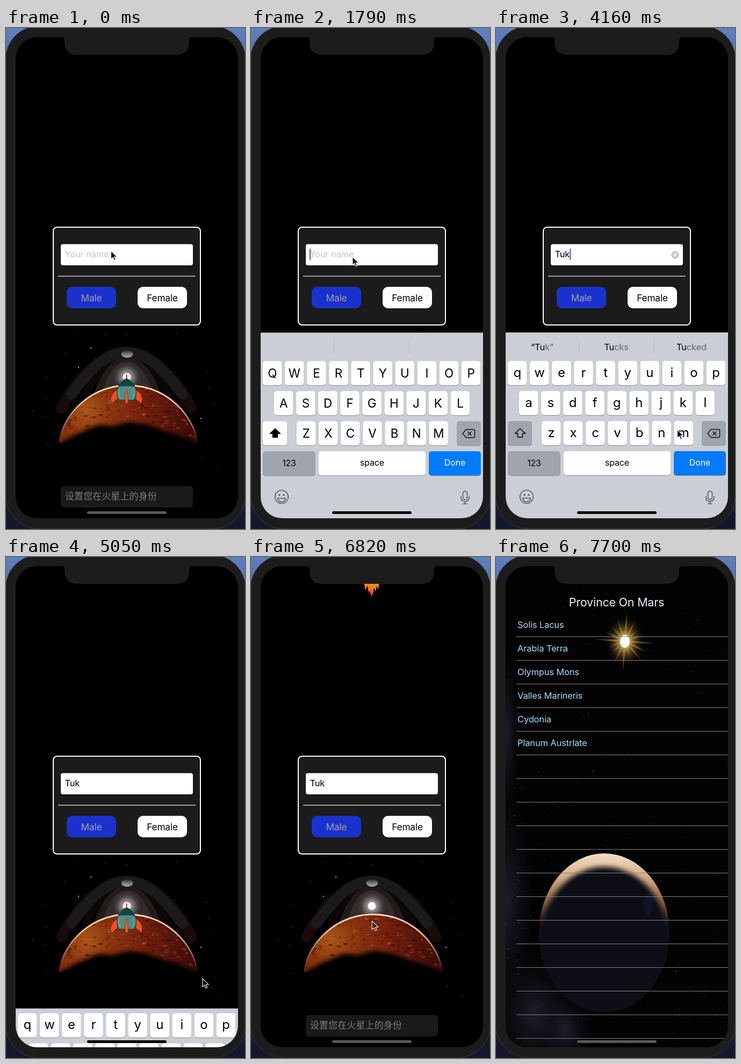
An HTML page for the animation above (7.85 s loop, 445x933 px).

```html
<!DOCTYPE html>
<html lang="en">
<head>
<meta charset="utf-8">
<title>Mars identity</title>
<style>
  html, body { margin: 0; width: 100%; height: 100%; overflow: hidden; background: #1c1c1c; }
  svg { display: block; width: 100%; height: 100%; }
  text { font-family: Inter, Roboto, sans-serif; font-size: 16.5px; letter-spacing: -.01em; white-space: pre; }
  .mid { text-anchor: middle; }
  .cjk { font-family: "Noto Sans CJK SC", "Noto Sans CJK", sans-serif; font-size: 17px; letter-spacing: .1px; }
</style>
</head>
<body>
<svg viewBox="0 0 445 933" preserveAspectRatio="none">
  <defs>
    <linearGradient id="desk" x2="0" y2="1">
      <stop offset="0" stop-color="#5f80bd"/><stop offset=".1" stop-color="#4a66a2"/>
      <stop offset=".9" stop-color="#1d1f38"/><stop offset="1" stop-color="#14172a"/>
    </linearGradient>
    <radialGradient id="mars" gradientUnits="userSpaceOnUse" cx="150" cy="712" r="215">
      <stop offset="0" stop-color="#a9581a"/><stop offset=".2" stop-color="#8c350f"/>
      <stop offset=".5" stop-color="#74200d"/><stop offset="1" stop-color="#33090a"/>
    </radialGradient>
    <linearGradient id="rim" gradientUnits="userSpaceOnUse" x1="0" y1="662" x2="0" y2="772">
      <stop offset="0" stop-color="#fff3e6"/><stop offset=".35" stop-color="#e2b79a"/>
      <stop offset=".75" stop-color="#8f5a44"/><stop offset="1" stop-color="#3a1a14" stop-opacity="0"/>
    </linearGradient>
    <radialGradient id="halo">
      <stop offset="0" stop-color="#fff"/><stop offset=".15" stop-color="#eee"/>
      <stop offset=".3" stop-color="#8d8785"/><stop offset=".6" stop-color="#4a4645"/>
      <stop offset="1" stop-color="#221f1f" stop-opacity="0"/>
    </radialGradient>
    <linearGradient id="moon" x2="0" y2="1">
      <stop offset="0" stop-color="#222"/><stop offset=".5" stop-color="#777"/><stop offset="1" stop-color="#aaa"/>
    </linearGradient>
    <linearGradient id="flame" x2="0" y2="1">
      <stop offset="0" stop-color="#ffe14a"/><stop offset=".7" stop-color="#ffa024"/>
      <stop offset=".86" stop-color="#f47a20"/><stop offset="1" stop-color="#e0202c"/>
    </linearGradient>
    <radialGradient id="sun">
      <stop offset="0" stop-color="#fff"/><stop offset=".25" stop-color="#fff3c0"/>
      <stop offset=".5" stop-color="#c08f35" stop-opacity=".6"/><stop offset="1" stop-color="#3a2a10" stop-opacity="0"/>
    </radialGradient>
    <linearGradient id="crescent" gradientUnits="userSpaceOnUse" x1="0" y1="552" x2="0" y2="690">
      <stop offset="0" stop-color="#f3dfc8"/><stop offset=".3" stop-color="#d6b08a"/>
      <stop offset=".7" stop-color="#7d5637"/><stop offset="1" stop-color="#0e0e17"/>
    </linearGradient>
    <radialGradient id="haze">
      <stop offset="0" stop-color="#252735" stop-opacity=".75"/><stop offset="1" stop-color="#15151c" stop-opacity="0"/>
    </radialGradient>
    <filter id="soft" x="-20%" y="-20%" width="140%" height="140%"><feGaussianBlur stdDeviation="4"/></filter>
    <filter id="drop" x="-40%" y="-20%" width="180%" height="150%">
      <feDropShadow dx="0" dy="2" stdDeviation="4" flood-opacity=".25"/>
    </filter>
    <clipPath id="screen"><rect x="18" y="17" width="414" height="896" rx="40"/></clipPath>
    <clipPath id="disc"><circle cx="228" cy="795" r="132"/></clipPath>
    <clipPath id="world"><ellipse cx="201.5" cy="700" rx="121.5" ry="148"/></clipPath>
  </defs>

  <rect width="445" height="933" fill="url(#desk)"/>
  <rect x="-1" y="-4" width="447" height="937" rx="63" fill="#1c1c1c" stroke="#3b3b3d"/>

  <g clip-path="url(#screen)">
    <rect x="18" y="17" width="414" height="896"/>
    <g id="space">
      <g fill="none" stroke-linecap="round">
        <path d="M104 708C130 655 178 603 225 603S320 655 345 708" stroke="#180b09" stroke-width="20"/>
        <path d="M122 682C150 645 185 604 225 604S300 645 328 682" stroke="#1b1a1a" stroke-width="20"/>
        <path d="M150 680C170 640 195 624 225 624S280 640 300 680" stroke="#0d0808" stroke-width="14"/>
      </g>
      <path d="M160 690C182 630 200 614 225 614S270 630 292 690Z" fill="#211b1a"/>
      <path d="M178 684C190 640 205 621 225 621S262 640 274 684Z" fill="#322d2c"/>
      <circle cx="225" cy="650" r="31" fill="url(#halo)"/>
      <circle cx="225" cy="650" r="7" fill="#fff"/>
      <ellipse cx="225.500" cy="607" rx="11" ry="7" fill="url(#moon)"/>
      <g clip-path="url(#disc)">
        <circle cx="228" cy="795" r="132" fill="url(#mars)"/>
        <g id="soil"></g>
        <path d="M80 930V785L108 768 130 757 150 748 172 739 200 741 228 733 262 738 292 749 318 757 345 768 380 790V930Z" filter="url(#soft)"/>
        <rect x="90" y="773" width="280" height="160"/>
      </g>
      <path d="M98 772A132 132 0 0 1 357 772" fill="none" stroke="url(#rim)" stroke-width="2.800"/>
    </g>
    <rect x="102" y="853" width="246" height="40" rx="6" fill="#1a1a1a"/>
    <text class="cjk" x="110" y="878" fill="#7b7b7b">设置您在火星上的身份</text>

    <rect x="88" y="371" width="274" height="182" rx="7" fill="#1b1b1b" stroke="#fff" stroke-width="2"/>
    <rect x="102" y="402.500" width="246" height="39.500" rx="4" fill="#fff"/>
    <text id="field" x="109.500" y="427"></text>
    <rect id="caret" y="411" width="2" height="21" fill="#3f62d0"/>
    <g id="clear">
      <circle cx="333.500" cy="422.500" r="7.200" fill="#c7c7cb"/>
      <path d="M330.700 419.700l5.600 5.600m0-5.600l-5.600 5.600" stroke="#fff" stroke-width="1.300"/>
    </g>
    <rect x="97" y="461.500" width="256" height="1.500" fill="#c9c9c9"/>
    <rect x="113" y="482" width="92" height="40" rx="10" fill="#1a32cc"/>
    <rect x="245" y="482" width="92" height="40" rx="10" fill="#fff"/>
    <text class="mid" x="159" y="509" fill="#a0a0a6" style="font-size:17.300px">Male</text>
    <text class="mid" x="291" y="509" style="font-size:17.300px">Female</text>

    <g id="rocket">
      <path id="fire" d="M212 690L211 772 213 784 217 775 219 789 221 785 224 796 228 788 229 779 232 787 234 776 237 783 239 768 238 690Z" fill="url(#flame)"/>
      <path d="M224.500 645V656" stroke="#d4213d" stroke-width="2"/>
      <path d="M207 674C197 680 193 690 197 699L207 691ZM242 674C252 680 256 690 252 699L242 691Z" fill="#e9512a" stroke="#9c2c17" stroke-width=".7"/>
      <path d="M211 693C202 681 207 659 224.500 653 242 659 247 681 238 693Z" fill="#4f8d85" stroke="#163b3b"/>
      <path d="M209 668C213 659 219 655 224.500 653 230 655 236 659 240 668Q224.500 666 209 668Z" fill="#124342"/>
      <path d="M212 672Q208 681 213 690M236 672Q240 681 236 690" fill="none" stroke="#73aba1" stroke-width="1.500"/>
      <path d="M224.500 673Q220 684 222.500 699H226.500Q229 684 224.500 673Z" fill="#f0572a" stroke="#9c2c17" stroke-width=".7"/>
    </g>

    <g id="board">
      <rect id="boardBg" x="18" width="414" height="400" fill="#cbced4"/>
      <g id="bar"><path d="M154.500 582v24M294.500 582v24" stroke="#b4b7bd"/></g>
      <g id="keys"></g>
      <path id="shift" d="M45 746l-9.500 9h5v7h9v-7h5z" stroke="#000" stroke-width="1.400" stroke-linejoin="round"/>
      <path d="M394 755l6.500-7.500h14q2 0 2 2v11q0 2-2 2h-14zM403.500 751.500l7 7m0-7l-7 7" fill="none" stroke="#111" stroke-width="1.500" stroke-linejoin="round"/>
      <g fill="none" stroke="#55585d" stroke-width="1.600">
        <circle cx="57" cy="873" r="12.300"/>
        <path d="M49.500 875.500h15q-1.500 7-7.500 7t-7.500-7z"/>
        <rect x="394.500" y="862.500" width="8" height="15.500" rx="4"/>
        <path d="M391 872v2q0 7.500 7.500 7.500t7.500-7.500v-2M398.500 881.500v4.500m-4 0h8"/>
      </g>
      <circle cx="53" cy="869.500" r="1.700" fill="#55585d"/><circle cx="61" cy="869.500" r="1.700" fill="#55585d"/>
    </g>
    <g id="popup" filter="url(#drop)">
      <path d="M-30.500-53q0-9 9-9h43q9 0 9 9v34c0 15-12.800 14-12.800 28v31q0 5-5 5h-25.400q-5 0-5-5v-31c0-14-12.800-13-12.800-28z" fill="#fff"/>
      <text id="popChar" class="mid" y="-21" style="font-size:35px;font-weight:300"></text>
    </g>
    <g id="list"></g>
    <rect id="home" x="151" y="900" width="148" height="5" rx="2.500"/>
    <path id="cursor" d="M0 0V15.500L3.700 12.200 6.200 17.800 8.700 16.700 6.200 11.200H11Z" stroke="#fff" stroke-width="1.100"/>
  </g>
  <path d="M103 16q6 1 6 8v2q0 24 24 24h184q24 0 24-24v-2q0-7 6-8z" fill="#1c1c1c"/>
</svg>

<script>
const LOOP = 7850;
const $ = id => document.getElementById(id);
const clamp = x => Math.min(1, Math.max(0, x));
const smooth = x => x * x * (3 - 2 * x);
const show = (el, on) => el.setAttribute('display', on ? 'inline' : 'none');
const move = (el, x, y) => el.setAttribute('transform', `translate(${x} ${y})`);

function add(parent, name, attrs, text) {
  const el = document.createElementNS('http://www.w3.org/2000/svg', name);
  for (const k in attrs) el.setAttribute(k, attrs[k]);
  if (text) el.textContent = text;
  return parent.appendChild(el);
}

function random(seed) {
  return () => (seed = (seed * 16807) % 2147483647) / 2147483647;
}

// Planet scene
function buildSpace() {
  const rnd = random(71);
  const tones = ['#3a0d06', '#210605', '#c06a22', '#a03a14', '#5a1509'];
  for (let i = 0; i < 420; i++) {
    add($('soil'), 'ellipse', {
      cx: 98 + rnd() * 260, cy: 667 + rnd() * 100, rx: .8 + rnd() * 4, ry: .5 + rnd() * 1.6,
      fill: tones[Math.floor(rnd() * 5)], opacity: .2 + rnd() * .35
    });
  }
  const stars = [[134, 569], [158, 596], [185, 570], [225, 573], [318, 568], [315, 640], [374, 643],
    [377, 673], [387, 700], [363, 727], [365, 800], [394, 818], [74, 649], [75, 690], [73, 723],
    [75, 775], [110, 604], [135, 632], [50, 713]];
  stars.forEach(([cx, cy], i) => add($('space'), 'circle', {
    cx, cy, r: i % 8 == 1 ? 1.2 : .8, fill: i % 8 == 1 ? '#aaa' : '#5c5653'
  }));
}

// Keyboard
const letters = {};
let hints;
function key(x, y, w, fill) {
  add($('keys'), 'rect', { x, y: y + 1, width: w, height: 45, rx: 5, fill: '#888b91' });
  return add($('keys'), 'rect', { x, y, width: w, height: 45, rx: 5, fill });
}
function label(x, y, size, text, fill = '#000') {
  return add($('keys'), 'text', { class: 'mid', x, y, fill, style: `font-size:${size}px` }, text);
}
function buildBoard() {
  [['QWERTYUIOP', 22], ['ASDFGHJKL', 43], ['ZXCVBNM', 85]].forEach(([row, left], r) => {
    [...row].forEach((c, i) => {
      const x = left + i * 41.08, y = 620 + r * 56;
      key(x, y, 35.5, '#fff');
      letters[c] = { x: x + 17.75, y, el: label(x + 17.75, y + 31, 22.5, c) };
    });
  });
  const shiftKey = key(22, 732, 45, '#fff');
  shiftKey.id = 'shiftKey';
  key(383, 732, 45, '#a0a4af');
  key(22, 788, 98, '#a0a4af');
  key(126, 788, 199, '#fff');
  key(331, 788, 97, '#007aff');
  label(71, 816, 16, '123');
  label(225.5, 815, 16, 'space');
  label(379.5, 815, 16, 'Done', '#fff');
  hints = [86, 224, 364].map(x => {
    const el = add($('bar'), 'text', { class: 'mid', x, y: 600 });
    return [add(el, 'tspan', {}), add(el, 'tspan', {})];
  });
}

// Province list
function buildList() {
  const list = $('list'), rnd = random(19);
  add(list, 'rect', { x: 18, y: 17, width: 414, height: 896, fill: '#030304' });
  [[20, 640, 50, 200], [70, 850, 75, 110], [130, 880, 50, 70], [20, 330, 25, 150]].forEach(([cx, cy, rx, ry]) =>
    add(list, 'ellipse', { cx, cy, rx, ry, fill: 'url(#haze)' }));
  for (let i = 0; i < 420; i++) {
    const side = i % 3 == 0;
    add(list, 'circle', {
      cx: 18 + (side ? rnd() * rnd() * 150 : rnd() * 414), cy: side ? 400 + rnd() * 510 : 20 + rnd() * 890,
      r: .4 + rnd() * .7, fill: '#9a9cab', opacity: .08 + rnd() * rnd() * .5
    });
  }
  const world = add(list, 'g', { 'clip-path': 'url(#world)' });
  add(world, 'rect', { x: 70, y: 545, width: 265, height: 310, fill: 'url(#crescent)' });
  add(world, 'ellipse', { cx: 201.5, cy: 722, rx: 121, ry: 145, fill: '#0e0e17', filter: 'url(#soft)' });
  add(world, 'rect', { x: 70, y: 686, width: 265, height: 170, fill: '#0e0e17' });
  add(world, 'ellipse', { cx: 283, cy: 648, rx: 8, ry: 22, fill: '#20204a', opacity: .35 });

  const sun = add(list, 'g', { transform: 'translate(240 157)' });
  add(sun, 'ellipse', { rx: 36, ry: 46, fill: 'url(#sun)', opacity: .75 });
  for (let i = 0; i < 16; i++) {
    const len = i % 4 == 0 ? 56 : 28 + rnd() * 20;
    add(sun, 'path', { d: `M-2.500 0L0 ${-len} 2.500 0Z`, fill: '#e8bd60', opacity: .42, transform: `rotate(${i * 22.5 + 4})` });
  }
  add(sun, 'ellipse', { rx: 18, ry: 23, fill: 'url(#sun)' });
  add(sun, 'ellipse', { rx: 9, ry: 12, fill: '#fffef4' });

  for (let y = 148.5; y < 913; y += 44) add(list, 'path', { d: `M38 ${y}H432`, stroke: '#828282' });
  add(list, 'text', { class: 'mid', x: 224.5, y: 91.5, fill: '#efedf8', style: 'font-size:21.500px' }, 'Province On Mars');
  ['Solis Lacus', 'Arabia Terra', 'Olympus Mons', 'Valles Marineris', 'Cydonia', 'Planum Austrlate']
    .forEach((name, i) => add(list, 'text', { x: 40, y: 132 + i * 44, fill: '#a8dcf8' }, name));
}

// The picture holds for 150 ms per step; steps ending at these indices are 10 ms shorter.
const shortSteps = [10, 15, 23, 28, 32, 40, 44, 46, 49, 52];
const stepStart = k => 150 * k - 10 * shortSteps.filter(s => s <= k).length;
function hold(t) {
  let k = 52;
  while (stepStart(k) > t) k--;
  return stepStart(k);
}

// time, x, y
const path = [[0, 195.5, 415], [150, 195.5, 415], [450, 189, 426], [1790, 189, 426], [2380, 205, 640],
  [2690, 205, 640], [2980, 356, 632], [3280, 288, 640], [3580, 288, 640], [3870, 348, 697],
  [4010, 348, 697], [4160, 337.5, 748], [4610, 372, 802], [4760, 372, 802], [5050, 366, 785],
  [5200, 366, 785], [5650, 225.5, 678], [7850, 225.5, 678]];
function pointer(t) {
  const i = path.findIndex(p => p[0] > t);
  const [t0, x0, y0] = path[i - 1], [t1, x1, y1] = path[i];
  const p = smooth((t - t0) / (t1 - t0));
  return [x0 + (x1 - x0) * p, y0 + (y1 - y0) * p];
}

const presses = [['T', 2680, 3100], ['U', 3430, 3560], ['K', 3870, 4000]];
const typed = [[4010, 'Tuk'], [3570, 'Tu'], [3130, 'T']];
const words = {
  '': ['I', 'The', 'I’m'], T: ['“T”', 'The', 'This'],
  Tu: ['“Tu”', 'Tuna', 'Tunes'], Tuk: ['“Tuk”', 'Tucks', 'Tucked']
};

function boardDrop(t) {
  if (t < 4870) {
    const p = clamp((t - 1440) / 360);
    return 346 * (1 - p) * (1 - p);
  }
  return 346 * smooth(clamp((t - 4874) / 288));
}

function drawText(t, editing) {
  const [since, value] = typed.find(e => t >= e[0]) || [1640, ''];
  const field = $('field');
  field.textContent = value || 'Your name';
  field.setAttribute('fill', value ? '#000' : '#c5c5c8');
  const end = value ? field.getComputedTextLength() : -.5;
  $('caret').setAttribute('x', 109.5 + end);
  show($('caret'), editing && t >= 1640 && (t - since) % 1000 < 550);
  show($('clear'), editing && value);

  const fade = clamp((t - since) / 300);
  hints.forEach(([head, tail], i) => {
    const word = t < 2090 ? '' : words[value][i];
    const cut = value.length < 2 ? word.length : i ? 2 : 3;
    head.textContent = word.slice(0, cut);
    tail.textContent = word.slice(cut);
    tail.setAttribute('opacity', fade);
  });

  for (const c in letters) {
    letters[c].el.textContent = value ? c.toLowerCase() : c;
    letters[c].el.setAttribute('y', letters[c].y + (value ? 29.5 : 31));
    letters[c].el.style.fontSize = value ? '24px' : '22.5px';
  }
  $('shiftKey').setAttribute('fill', value ? '#a0a4af' : '#fff');
  $('shift').setAttribute('fill', value ? 'none' : '#000');

  const press = presses.find(p => t >= p[1] && t < p[2]);
  show($('popup'), press);
  if (press) {
    const k = letters[press[0]];
    move($('popup'), k.x, k.y);
    $('popChar').textContent = value ? press[0].toLowerCase() : press[0];
  }
}

function render(t) {
  const drop = boardDrop(t), boardOn = drop < 346, editing = t >= 1490 && t < 4870;
  show($('board'), boardOn);
  move($('board'), 0, drop);
  show($('bar'), editing);
  $('boardBg').setAttribute('y', editing ? 567 : 611);
  drawText(t, editing);

  show($('fire'), t >= 6090);
  move($('rocket'), 0, t < 6060 ? 0 : -722 * ((t - 6060) / 760) ** 2);

  show($('list'), t >= 7260);
  move($('list'), 0, 896 * (1 - clamp((t - 7150) / 480)) ** 2);

  $('home').setAttribute('fill', boardOn ? '#000' : '#59595b');
  move($('cursor'), ...pointer(t));
  show($('cursor'), t < 7260);
}

buildSpace();
buildBoard();
buildList();
const begin = performance.now();
function tick() {
  render(hold((performance.now() - begin) % LOOP));
  requestAnimationFrame(tick);
}
tick();
</script>
</body>
</html>
```
